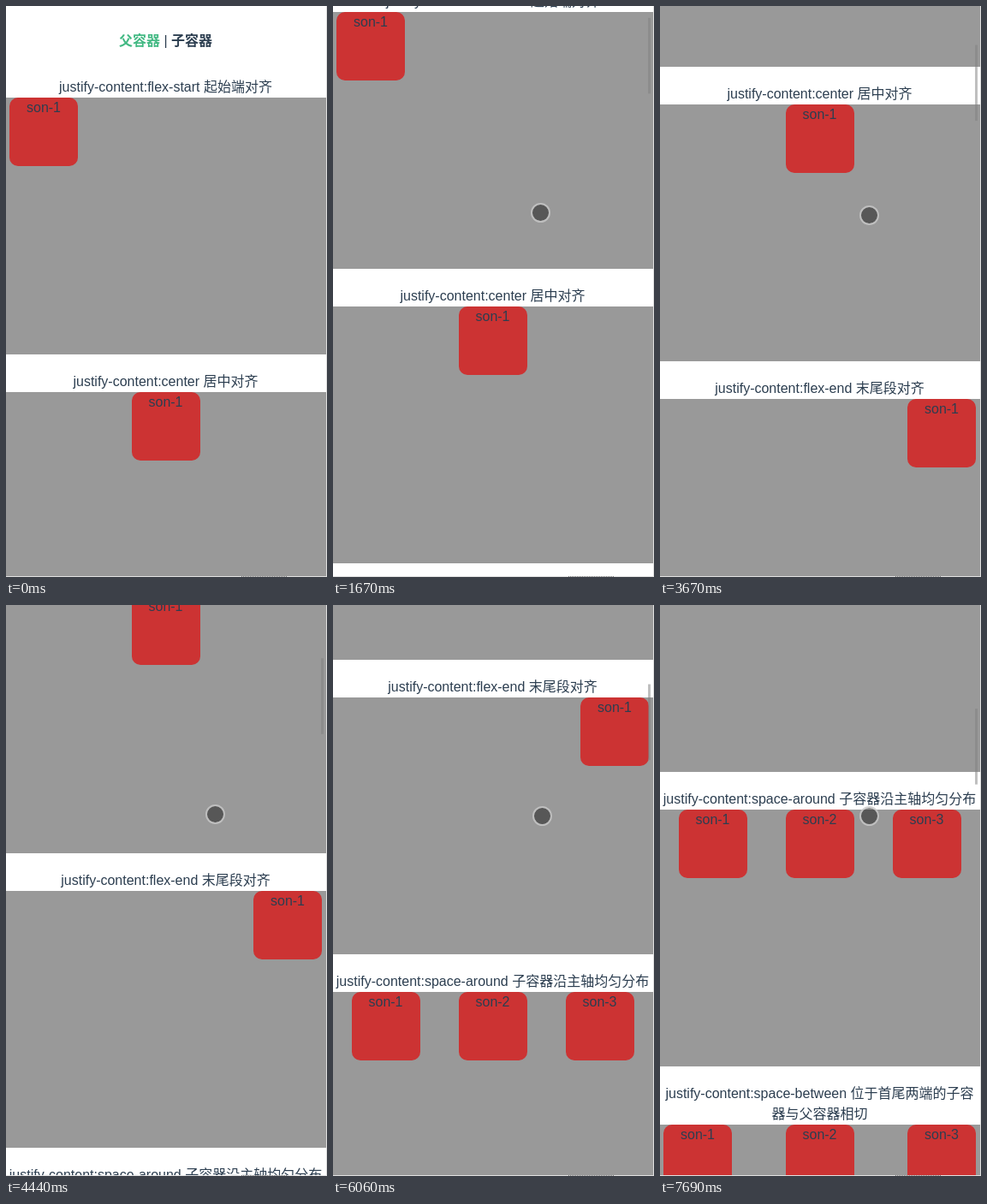
Animation, 375 px wide and 667 px high, one loop 8 s. Source, as an HTML page:

```html
<!DOCTYPE html>
<html lang="zh-CN">
<head>
<meta charset="utf-8">
<style>
html, body { margin: 0; width: 100%; height: 100%; overflow: hidden; background: #fff; }
svg { display: block; width: 375px; height: 667px; }
text { font: 16px "Liberation Sans", "Noto Sans CJK SC", "Noto Sans CJK", sans-serif; fill: #2c3e50; text-anchor: middle; }
.nav { font-weight: bold; }
.active { fill: #42b983; }
.bar { font-weight: normal; }
.parent { fill: #999; }
.son { fill: #c33; }
</style>
</head>
<body>
<svg viewBox="0 0 375 667">
  <g id="page">
    <text class="nav" x="186.5" y="46"><tspan class="active">父容器</tspan><tspan class="bar"> | </tspan><tspan>子容器</tspan></text>
  </g>
  <rect id="thumb" x="368" width="3" height="88.5" fill="#808080" fill-opacity=".5"/>
  <path d="M374.5 0V667M0 666.5H375" stroke="#e0e0e0"/>
  <path d="M275 666.5H328" stroke="#777" stroke-dasharray="1 1"/>
  <g id="touch">
    <circle r="9.7" fill-opacity=".43"/>
    <circle r="10.5" fill="none" stroke="#c8c8c8" stroke-opacity=".8" stroke-width="2"/>
  </g>
</svg>
<script>
const LOOP = 8000, FRAME = 77.1, FIRST = 210;
const WHEEL = 100, GLIDE = 200, BAR_TIME = 600;
const LEFT = -1, WIDTH = 375, HEIGHT = 300, SON = 80, MARGIN = 5, LINE = 24, GAP = 20;
const page = document.getElementById('page');
const thumb = document.getElementById('thumb');
const touch = document.getElementById('touch');

const sections = [
  ['flex-start', 1, '起始端对齐'],
  ['center', 1, '居中对齐'],
  ['flex-end', 1, '末尾段对齐'],
  ['space-around', 3, '子容器沿主轴均匀分布'],
  ['space-between', 3, '位于首尾两端的子容', '器与父容器相切']
];

// start of each wheel click
const clicks = [1106, 2056, 2769, 3598, 4336, 5115, 5915, 6596, 7469];

// pointer path: time, x, y
const path = [
  [210, 301, 655], [520, 189.5, 280], [750, 235.5, 241.5],
  [980, 238.5, 241.5], [1600, 238.5, 241.5], [1670, 242.5, 241.5]
];

function add(name, attrs, text) {
  const el = document.createElementNS('http://www.w3.org/2000/svg', name);
  for (const key in attrs) el.setAttribute(key, attrs[key]);
  if (text) el.textContent = text;
  page.appendChild(el);
}

// left edge of each child, as flexbox places them
function justify(mode, count) {
  const slot = SON + 2 * MARGIN, free = WIDTH - slot * count;
  const [lead, gap] = {
    'flex-start': [0, 0],
    'center': [free / 2, 0],
    'flex-end': [free, 0],
    'space-around': [free / count / 2, free / count],
    'space-between': [0, free / (count - 1)]
  }[mode];
  return Array.from({ length: count }, (_, i) => LEFT + lead + MARGIN + i * (slot + gap));
}

let top_ = 63;
for (const [mode, count, note, more] of sections) {
  const lines = [`justify-content:${mode} ${note}`];
  if (more) lines.push(more);
  top_ += GAP;
  for (const line of lines) {
    add('text', { x: LEFT + WIDTH / 2, y: top_ + 17 }, line);
    top_ += LINE;
  }
  add('rect', { class: 'parent', x: LEFT, y: top_, width: WIDTH, height: HEIGHT });
  justify(mode, count).forEach((x, i) => {
    add('rect', { class: 'son', x: Math.round(x), y: top_, width: SON, height: SON, rx: 10 });
    add('text', { x: x + SON / 2, y: top_ + 17 }, 'son-' + (i + 1));
  });
  top_ += HEIGHT;
}

const clamp = u => Math.max(0, Math.min(1, u));
const smooth = u => u * u * (3 - 2 * u);

function pointerAt(t, done) {
  const i = Math.max(1, path.findIndex(p => p[0] > t));
  const last = path[path.length - 1];
  if (t < last[0]) {
    const [a, b] = [path[i - 1], path[i]];
    const u = clamp((t - a[0]) / (b[0] - a[0]));
    return [1, 2].map(k => a[k] + (b[k] - a[k]) * u);
  }
  // the hand drifts a little with every click
  const drift = done - 1;
  return [last[1] + Math.min(2, 2 * drift), last[2] + Math.round(Math.min(5, 0.85 * drift))];
}

function draw(t) {
  const done = clicks.filter(c => c <= t);
  const y = Math.round(done.reduce((sum, c) => sum + WHEEL * smooth(clamp((t - c) / GLIDE)), 0));
  const bar = done.length && t < done[done.length - 1] + BAR_TIME;
  page.setAttribute('transform', `translate(0 ${-y})`);
  thumb.setAttribute('y', 0.5 + 0.134 * y);
  thumb.style.display = bar ? '' : 'none';
  touch.style.display = t < FIRST ? 'none' : '';
  touch.setAttribute('transform', `translate(${pointerAt(t, done.length)})`);
}

// the picture moves in steps of one recorded frame
const step = t => FIRST + FRAME * Math.floor((t + 20 - FIRST) / FRAME);

const began = performance.now();
function tick() {
  draw(step((performance.now() - began) % LOOP));
  requestAnimationFrame(tick);
}
tick();
</script>
</body>
</html>
```
